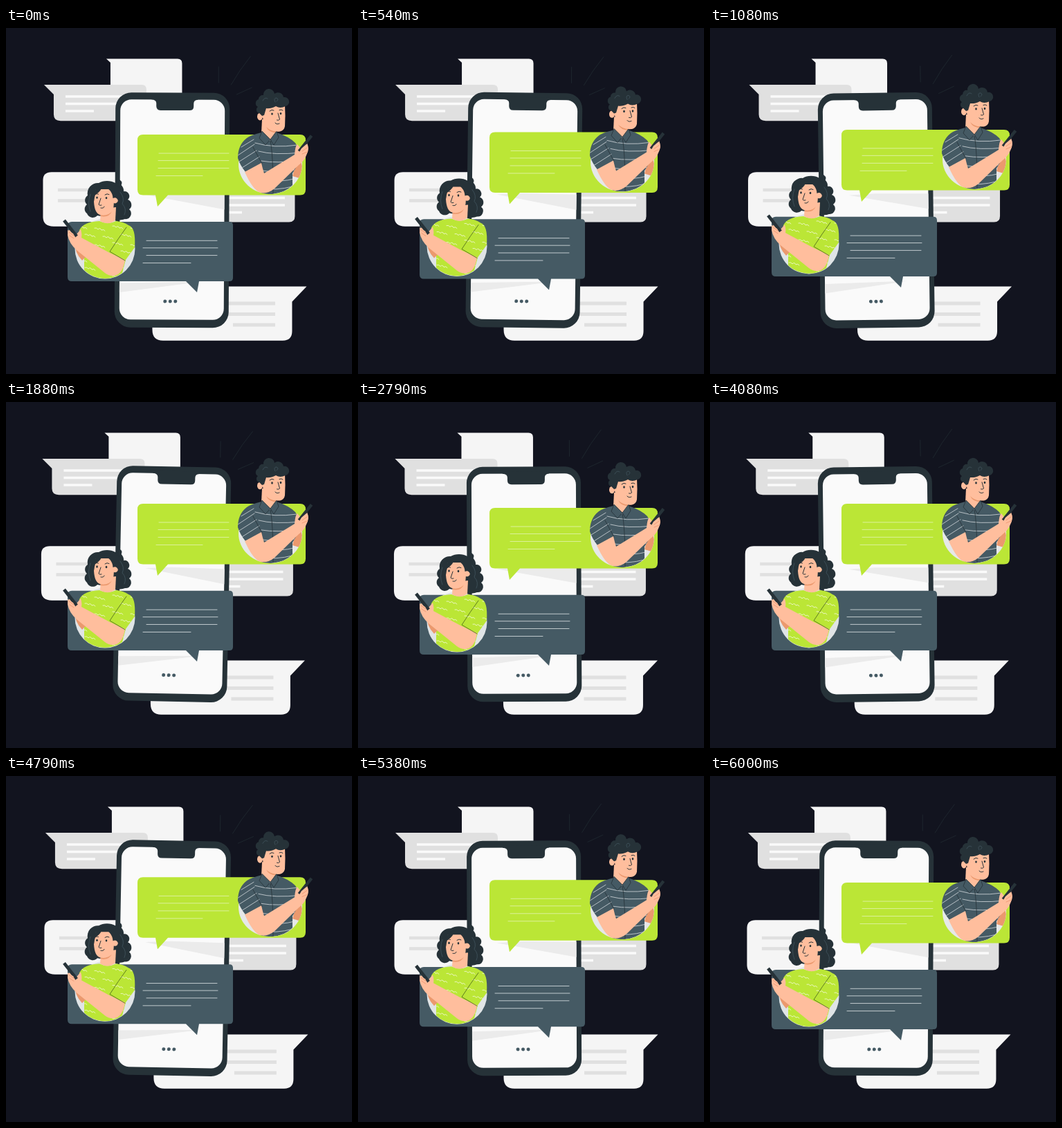
Recreate the animation shown at these times as an HTML page. Size 500x500 px, loop 6040 ms.

```html
<!DOCTYPE html>
<html lang="en">
<head>
<meta charset="utf-8">
<title>Chat</title>
<style>
  html, body { margin: 0; width: 100%; height: 100%; overflow: hidden; background: #12141f; }
  svg { display: block; width: 100%; height: 100%; }
  .line { fill: none; stroke-linecap: round; stroke-linejoin: round; }
  .bar { fill: none; }
  .ink { fill: #263238; }
  .slate { fill: #455a64; }
  .lime { fill: #bbe636; }
  .skin { fill: #ffbe9d; }
  .shade { fill: #eb996e; }
  .pale { fill: #f5f5f5; }
  .grey { fill: #e0e0e0; }
</style>
</head>
<body>
<svg viewBox="0 0 500 500">
  <defs>
    <clipPath id="manClip"><path d="M330 80H450V197H428A46 43 0 0 1 336 197L330 190Z"/></clipPath>
    <clipPath id="manShirt"><path id="manTop" d="M369 151Q353 155 348 159Q335 169 335 188Q338 198 346 208L368 196V240H384Q404 238 414 227L414 210L425 192Q425 176 418 166Q409 157 391 151L381 163Z"/></clipPath>
    <clipPath id="womanShirt"><path id="womanTop" d="M135 279Q112 280 106 292L104 310L113 328V350A43.500 43.500 0 0 0 168 354L173 335L186 317Q188 288 177 285Q170 280 159 279Q147 285 135 279Z"/></clipPath>
  </defs>

  <g id="back">
    <path class="pale" d="M145 44.500H248Q254.500 44.500 254.500 51V110H151V50Z"/>
    <path class="grey" d="M55 82H196Q203 82 203 89V134.200H79Q69 134.200 69 125V96Z"/>
    <path class="bar" stroke="#fafafa" stroke-width="3.300" d="M86 99H175M86 109.500H175M86 120H127"/>
    <path class="pale" d="M66 208.300H200V286.700H69Q53.500 286.700 53.500 273V220Q53.500 208.300 66 208.300Z"/>
    <path class="bar" stroke="#e0e0e0" stroke-width="4.500" d="M75 234H150M75 249.500H150"/>
    <path class="grey" d="M280 225H417.500V272Q417.500 280.500 409 280.500H280Z"/>
    <path class="bar" stroke="#fafafa" stroke-width="3.300" d="M290 245.500H403M290 256H403M290 266.500H341"/>
    <path class="pale" d="M225 373.500H434.500L413.500 395.500V438Q413.500 451.700 400 451.700H227Q211.500 451.700 211.500 436V385Q211.500 373.500 225 373.500Z"/>
    <path class="bar" stroke="#e0e0e0" stroke-width="5" d="M290 398H389M290 413.500H389M328 429H389"/>
  </g>

  <g id="phone">
    <path class="line" stroke="#263238" stroke-width=".6" d="M307 56V79M325 82Q337 61 353 41M333 96L355 86"/>
    <g transform="rotate(.22 240 263) translate(.5 0)">
      <rect class="ink" x="157" y="93.500" width="165" height="339.500" rx="23"/>
      <rect x="164" y="103.500" width="151" height="318" rx="16" fill="#fafafa"/>
      <path class="ink" d="M209 100H276V103.500Q270 104 270 109V113Q270 119 264 119H222Q216 119 216 113V109Q216 104 209 103.500Z"/>
      <path fill="#ebebeb" d="M200 241L238 239L315 240V262ZM164 369L284 366L164 382.500Z"/>
      <g class="slate"><circle cx="230" cy="395" r="2.500"/><circle cx="237.500" cy="395" r="2.500"/><circle cx="245" cy="395" r="2.500"/></g>
    </g>
  </g>

  <g id="chat">
    <path class="lime" d="M198 154H425Q433 154 433 162V233.500Q433 241.500 425 241.500H234L219 258L216 241.500H198Q190 241.500 190 233.500V162Q190 154 198 154Z"/>
    <path class="line" stroke="#e0f2a6" stroke-width=".9" d="M221 181H322M220 191.500H322M220 202.500H322M217 213.500H284"/>
    <path class="slate" d="M95 279.800H323Q328 279.800 328 285V361Q328 366 323 366H279L276 382L260 366H95Q89 366 89 360V286Q89 279.800 95 279.800Z"/>
    <path class="line" stroke="#cfd6da" stroke-width=".9" d="M203 307.200H305M198 317.700H306M203 328.500H305M198 339.500H267"/>

    <g id="man">
      <ellipse cx="382" cy="197" rx="46" ry="43" fill="#e6e8e8"/>
      <g clip-path="url(#manClip)">
        <path class="shade" d="M418 198L426 191L428 200Q427 212 424 217L414 214Z"/>
        <use href="#manTop" class="slate"/>
        <g clip-path="url(#manShirt)">
          <path class="line" stroke="#d5dade" stroke-width=".8" d="M340 172L358 161M335 184L359 168M337 193L362 177M341 202L366 186M360 166Q387 174 421 169M365 178Q387 184 426 180M369 192Q391 196 426 191M370 206Q394 210 423 204M371 220Q394 224 420 217M370 232Q390 235 414 229"/>
          <path class="line" stroke="#263238" stroke-width=".8" d="M382 163Q386 181 386 239M357 172L370 196"/>
        </g>
        <path class="skin" d="M345 208L369 195Q371 204 373 210L417 183Q418 170 421 168L428 177L435 166Q439 175 434 184Q431 192 423 198L388 232Q378 240 368 238Q357 235 345 208Z"/>
      </g>
      <path class="bar" stroke="#263238" stroke-width="4.500" d="M441.500 155.500L423.500 178"/>
      <path class="skin" d="M427 174L434 168Q438 171 436 179L429 185L421 184Z"/>
      <path class="line" stroke="#e58c68" stroke-width=".7" d="M428 178L435 173M428 182L435 179"/>
      <path class="skin" d="M370 132H390V153Q386 161 380 161Q372 158 369 152Z"/>
      <path class="shade" d="M376 143Q382 149 390 149V151Q380 151 376 143Z"/>
      <path class="slate" stroke="#263238" stroke-width=".8" d="M370 149L366 159L375 169L382 161ZM391 149L394 158L387 169L382 161Z"/>
      <path class="skin" d="M370 111H403Q404 127 403 142Q402 148 396 149.500Q381 151 374 139Q369 129 370 111Z"/>
      <ellipse class="skin" cx="367" cy="128" rx="4" ry="5.300"/>
      <path class="ink" d="M366 123A5 5 0 0 1 364 114A6 6 0 0 1 365 103A6 6 0 0 1 372 97A8 8 0 0 1 388 95A8 8 0 0 1 401 100A5.500 5.500 0 1 1 404 113Q396 117 390 113Q382 117 376 116L373 126L370 127Z"/>
      <g class="ink"><ellipse cx="384.500" cy="124" rx="1.300" ry="1.700"/><ellipse cx="397" cy="123.500" rx="1.300" ry="1.700"/></g>
      <path class="line" stroke="#455a64" stroke-width=".7" d="M389 107Q386 101 391 101Q395 103 391 106M371 105Q374 99 378 102"/>
      <path class="line" stroke="#263238" stroke-width="1" d="M381 120Q384 117 387 119M395 118.500Q398 117 400 119M393 123L395.500 132Q394 134 391.500 133M389 137Q391 140 395 138"/>
    </g>

    <g id="woman">
      <circle cx="143" cy="319" r="43.500" fill="#e0e4e6"/>
      <path class="ink" d="M134 224A18 12 0 0 1 158 224A11 11 0 0 1 170 236A7 7 0 0 1 176 248A8 8 0 0 1 178 262A8 8 0 0 1 172 276A13 9 0 0 1 156 275L132 271A9 9 0 0 1 117 268A8 8 0 0 1 117 255A8 8 0 0 1 118 242A15 15 0 0 1 134 224Z"/>
      <path class="ink" d="M158 225Q165 224 164 219Q171 224 164 230Z"/>
      <use href="#womanTop" class="lime"/>
      <g clip-path="url(#womanShirt)">
        <path class="line" id="waves" stroke="#f0f8cf" stroke-width=".9"/>
      </g>
      <path class="shade" d="M99 308Q99 325 110 336L118 328L105 310Z"/>
      <path class="skin" d="M137 261L159 259L158 278Q147 286 136 279Z"/>
      <path class="shade" d="M137 269Q147 272 153 265Q149 274 137 272Z"/>
      <path class="skin" d="M130 233L154 233Q158 253 154 264Q146 273 136 270Q128 268 127 251Q127 242 130 233Z"/>
      <circle class="skin" cx="157.500" cy="249" r="4.300"/>
      <path class="ink" d="M121 262Q119 236 140 226Q138 236 129 241Q126 250 127 262ZM138 227Q154 233 154.500 246Q160 243 163 251L168 235Q155 221 138 227Z"/>
      <path class="line" stroke="#455a64" stroke-width=".7" d="M122 240Q117 253 122 265M165 237Q172 246 168 254Q175 261 171 270"/>
      <g class="ink"><ellipse cx="131.500" cy="245" rx="1.300" ry="1.700"/><ellipse cx="145" cy="245.500" rx="1.300" ry="1.700"/></g>
      <path class="line" stroke="#263238" stroke-width="1" d="M129 240.500Q131 238.500 133.500 240M143 241Q146 238.500 149 240.500M137 246L134 255Q135 257 138 256M137 260Q141 261 142 258"/>
      <path class="skin" d="M90 293Q95 289 102 298L108 291Q110 298 109 303L150 325L172 335Q169 353 160 357Q151 360 143 354L102 321Q91 311 89 299Z"/>
      <path class="line" stroke="#55701f" stroke-width=".9" d="M174 288Q163 303 150 323L172 336"/>
      <path class="bar" stroke="#263238" stroke-width="4.800" d="M84 278L102 301"/>
      <path class="skin" d="M89 292L97 297L100 302L93 304Q89 300 89 292Z"/>
      <path class="line" stroke="#e58c68" stroke-width=".7" d="M91 295L98 300M92 300L98 304"/>
    </g>
  </g>
</svg>
<script>
  const $ = id => document.getElementById(id);
  const LOOP = 6040, LEAD = 25;

  // Shirt pattern: staggered rows of small waves
  let waves = '';
  for (let row = 0; row < 7; row++)
    for (let col = 0; col < 4; col++) {
      const x = 102 + col * 26 + (row % 2) * 12, y = 286 + row * 12 + (col % 2) * 3;
      waves += `M${x} ${y}q3 -1 5 2q3 -3 5 1q3 -2 5 1`;
    }
  $('waves').setAttribute('d', waves);

  // Linear interpolation through evenly spaced keys
  function cycle(time, period, keys) {
    const p = time % period / period * (keys.length - 1);
    const i = Math.floor(p);
    return keys[i] + (keys[i + 1] - keys[i]) * (p - i);
  }

  const move = (id, transform) => $(id).setAttribute('transform', transform);

  function draw() {
    const t = performance.now() % LOOP + LEAD;
    move('back', `translate(${cycle(t, 6000, [0, -1, 2, -4, 4, -4, 4, -4, 2, -1, 0])} 0)`);
    move('phone', `rotate(${cycle(t, 1500, [0, 1, 0, -1, 0])} 250 250)`);
    move('chat', `translate(0 ${cycle(t, 3000, [0.25, -9.75, 0.25])})`);
    requestAnimationFrame(draw);
  }
  draw();
</script>
</body>
</html>
```
